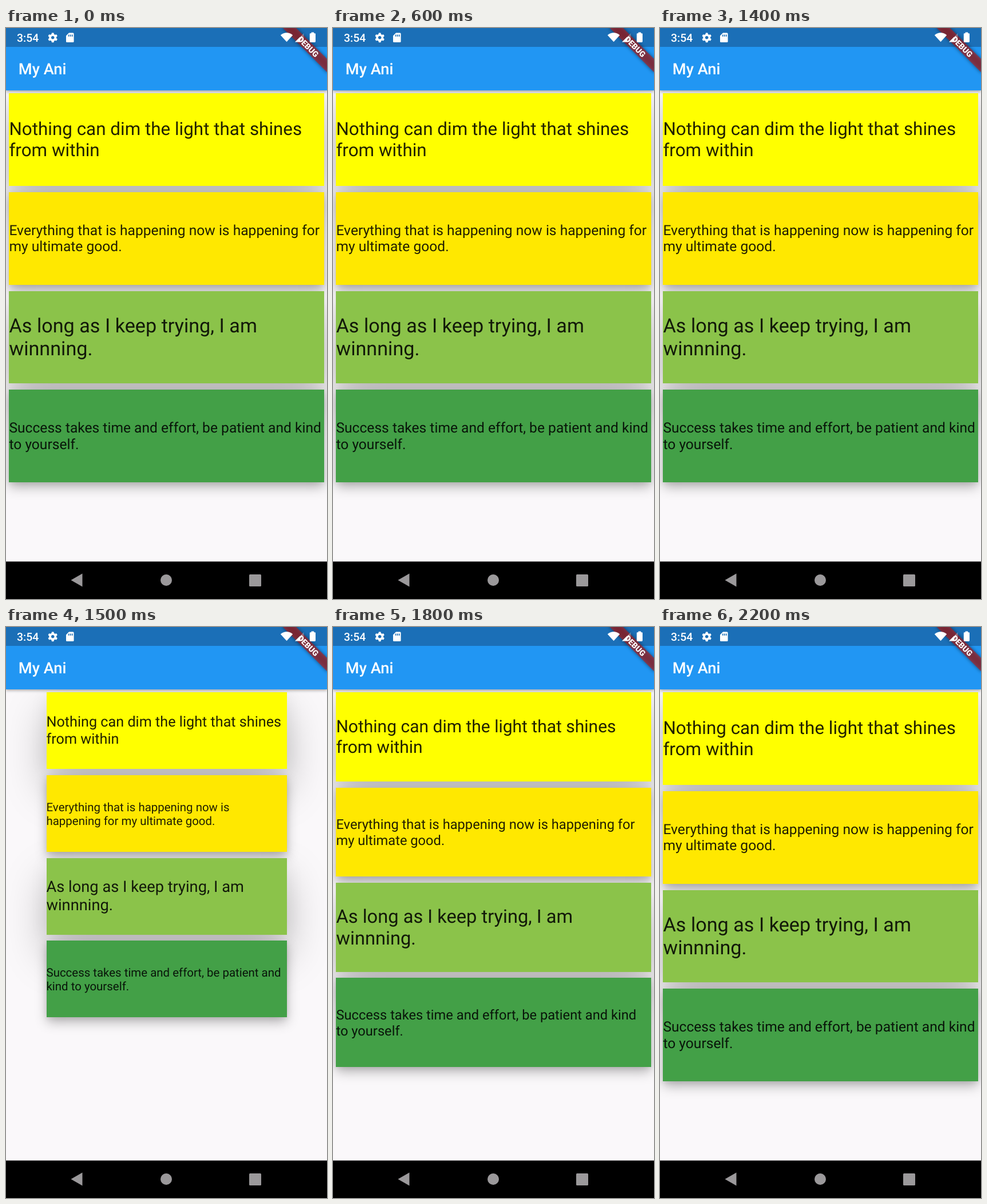
An HTML page for the animation above (2.3 s loop, 561 px wide and 998 px high).

```html
<!DOCTYPE html>
<html lang="en">
<head>
<meta charset="utf-8">
<title>My Ani</title>
<style>
  html, body { margin: 0; width: 100%; height: 100%; overflow: hidden; }
  body {
    position: relative;
    background: #faf8fa;
    font-family: Roboto, sans-serif;
    text-rendering: geometricPrecision;
  }
  .bar {
    position: absolute; top: 0; left: 0; width: 561px; height: 109px;
    background: linear-gradient(#1b6fb7 32.7px, #2196f3 32.7px);
    box-shadow: 0 2px 5px rgba(0, 0, 0, .32);
  }
  .bar h1 {
    position: absolute; left: 21.8px; top: 56px; margin: 0;
    font-size: 27.27px; font-weight: 500; line-height: 32px; color: #fff;
  }

  /* --q runs from 0 (small cards) to 1 (settled cards) */
  .list {
    --q: 1;
    position: absolute; top: 114.4px; left: 0; width: 561px;
    isolation: isolate;
  }
  .card {
    position: relative;
    display: flex; align-items: center;
    width: min(550.1px, 420px + 260px * var(--q));
    height: calc(133.8px + 27.9px * var(--q));
    margin: 0 auto 10.9px;
    background: var(--color);
    font-size: calc(var(--small) + (var(--large) - var(--small)) * var(--q));
    line-height: 1.172;
    color: rgba(0, 0, 0, .87);
  }
  .card::before {
    content: ""; position: absolute; inset: 0; z-index: -1;
    box-shadow: 0 9px 20px -1px rgba(0, 0, 0, .29), 0 3px 9px rgba(0, 0, 0, .08);
  }
  .high::before {
    box-shadow: 0 36px 72px rgba(0, 0, 0, .25), 0 4px 30px rgba(0, 0, 0, .07);
  }
  .card p { position: relative; top: 1.6px; margin: 0; }
  .high p { top: .5px; }

  svg { position: absolute; top: 0; left: 0; }
</style>
</head>
<body>
<main class="list">
  <div class="card high" style="--color:#ff0; --small:25.2px; --large:31.4px"><p>Nothing can dim the light that shines from within</p></div>
  <div class="card" style="--color:#ffe800; --small:20.45px; --large:24.6px"><p>Everything that is happening now is happening for my ultimate good.</p></div>
  <div class="card high" style="--color:#8bc34a; --small:27.25px; --large:34.2px"><p>As long as I keep trying, I am winnning.</p></div>
  <div class="card" style="--color:#43a047; --small:20.45px; --large:24.6px"><p>Success takes time and effort, be patient and kind to yourself.</p></div>
</main>

<header class="bar"><h1>My Ani</h1></header>

<svg width="561" height="998" viewBox="0 0 561 998" font-family="Roboto, sans-serif" fill="#fff">
  <defs>
    <filter id="soft" x="-20%" y="-60%" width="140%" height="220%"><feGaussianBlur stdDeviation="3.2"/></filter>
  </defs>

  <!-- corner ribbon -->
  <g transform="translate(561) rotate(45)">
    <rect x="-56" y="38.2" width="112" height="16.4" fill="#000" opacity=".5" filter="url(#soft)"/>
    <rect x="-56" y="38.2" width="112" height="16.4" fill="#b71c1c" opacity=".63"/>
    <text y="51.3" text-anchor="middle" font-size="13.9" font-weight="900">DEBUG</text>
  </g>

  <!-- status icons -->
  <text x="19" y="24" font-size="19.4" font-weight="500">3:54</text>
  <g transform="translate(81.7 16.8)">
    <circle r="4.6" fill="none" stroke="#fff" stroke-width="3.6"/>
    <path id="tooth" d="M-1.7-8.4h3.4l.7 3h-4.8zM-1.7 8.4h3.4l.7-3h-4.8z"/>
    <use href="#tooth" transform="rotate(60)"/>
    <use href="#tooth" transform="rotate(120)"/>
  </g>
  <path fill-rule="evenodd" d="M110 8.5h7q1.6 0 1.6 1.6v13.3q0 1.6-1.6 1.6h-10.4q-1.6 0-1.6-1.6v-9.8zM109 11.5v3.5h1.6v-3.5zM112 11.5v3.500h1.6v-3.5zM115 11.5v3.5h1.6v-3.5z"/>
  <path d="M479.8 12.4q10.7-8.2 21.4 0l-10.7 11.8z"/>
  <path d="M505 24.5L520.5 9v15.5z" opacity=".3"/>
  <path d="M505 24.5L514 15.500v9z"/>
  <path d="M533.6 9.2v-1.7h4.6v1.7h1.4q1.4 0 1.4 1.4v13q0 1.4-1.4 1.4h-7.4q-1.4 0-1.4-1.4v-13q0-1.4 1.4-1.4z"/>

  <!-- navigation bar -->
  <rect y="932.5" width="561" height="65.5" fill="#000"/>
  <g fill="#9b999b">
    <path d="M113.5 965L133.5 953.5v23z"/>
    <circle cx="280" cy="965" r="10"/>
    <rect x="425" y="955" width="21" height="21" rx="1.5"/>
  </g>
</svg>

<script>
  const LOOP = 2300, STEP = 100;
  const GROW_AT = 1500, SETTLE_AT = 2263;
  const list = document.querySelector('.list');

  // Cards snap small at GROW_AT, then ease out to full size.
  function growth(t) {
    if (t < GROW_AT) return 1;
    return 1 - Math.max(0, (SETTLE_AT - t) / (SETTLE_AT - GROW_AT)) ** 3;
  }

  function draw() {
    const t = Math.floor(performance.now() % LOOP / STEP) * STEP;
    list.style.setProperty('--q', growth(t).toFixed(4));
    requestAnimationFrame(draw);
  }
  draw();
</script>
</body>
</html>
```
